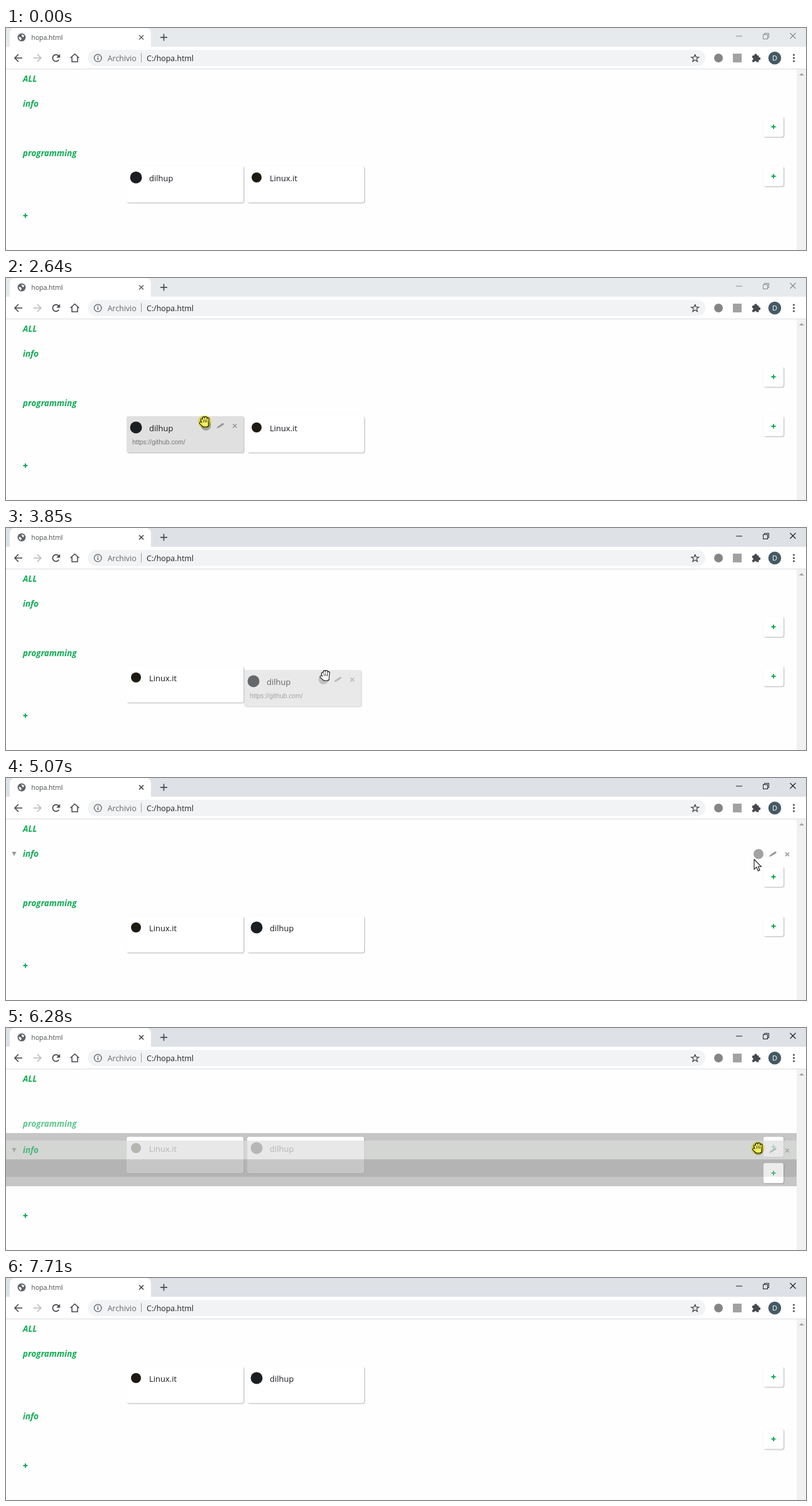
Animation, 1280 px wide and 355 px high, one loop 8340 ms. Source, as an HTML page with a canvas:

```html
<!DOCTYPE html>
<html lang="it">
<head>
<meta charset="utf-8">
<style>
html, body { margin: 0; width: 100%; height: 100%; overflow: hidden; background: #fefefe; }
canvas { display: block; }
</style>
</head>
<body>
<canvas id="stage" width="1280" height="355"></canvas>
<script>
const W = 1280, H = 355, LOOP = 8340;
const stage = document.getElementById('stage').getContext('2d');
const layerCanvas = document.createElement('canvas');
layerCanvas.width = W;
layerCanvas.height = H;
const layer = layerCanvas.getContext('2d');
let ctx = stage;

const GREEN = '#12ab55', DARK = '#46494d', UI = '"Open Sans", "Noto Sans", sans-serif';
const LEFT = 193, RIGHT = 386;

// time, pointer kind, x, y, hovered part, info heading y, programming heading y
const STEPS = [
  [0, '', 0, 0, '', 121, 200],
  [1420, 'arrow', 520, 304, 'plus', 121, 200],
  [1620, 'arrow', 475, 268, 'linux', 121, 200],
  [1830, 'arrow', 410, 250, 'linux', 121, 200],
  [2030, 'arrow', 350, 240, 'repo', 121, 200],
  [2240, 'hand', 320, 232, 'repo', 121, 200],
  [2440, 'hand', 318, 230, 'repo', 121, 200],
  [2640, 'press', 318, 230, 'repo', 121, 200],
  [2830, 'press', 333, 231, 'repo', 121, 200],
  [3040, 'press', 372, 233, 'repo', 121, 200],
  [3240, 'press', 428, 235, 'repo', 121, 200],
  [3450, 'press', 478, 235, 'repo', 121, 200],
  [3650, 'press', 506, 235, 'repo', 121, 200],
  [3850, 'hand', 511, 236, 'repo', 121, 200],
  [4060, 'hand', 513, 236, 'repo', 121, 200],
  [4260, 'arrow', 610, 226, '', 121, 200],
  [4460, 'arrow', 800, 209, 'programming', 121, 200],
  [4660, 'arrow', 1010, 190, 'programming', 121, 200],
  [4860, 'arrow', 1160, 151, '', 121, 200],
  [5070, 'arrow', 1197, 130, 'info', 121, 200],
  [5270, 'hand', 1200, 121, 'info', 121, 200],
  [5480, 'hand', 1200, 119, 'info', 121, 200],
  [5680, 'press', 1200, 119, 'info', 121, 200],
  [5900, 'press', 1200, 126, 'info', 128, 200],
  [6080, 'press', 1201, 163, 'info', 166, 200],
  [6280, 'press', 1203, 192, 'info', 195, 153],
  [6510, 'press', 1203, 200, 'info', 203, 121],
  [6690, 'arrow', 1204, 197, 'info', 207, 121],
  [6900, 'arrow', 1204, 207, 'info', 220.5, 121],
  [7110, 'arrow', 1203, 215, 'info', 220.5, 121],
  [7320, 'arrow', 1197, 240, '', 220.5, 121],
  [7490, 'arrow', 1120, 298, 'plus', 220.5, 121],
  [7710, '', 0, 0, '', 220.5, 121]
];

function rect(x, y, w, h, fill, r = 0) {
  ctx.fillStyle = fill;
  ctx.beginPath();
  ctx.roundRect(x, y, w, h, r);
  ctx.fill();
}
function disc(x, y, r, fill) {
  ctx.fillStyle = fill;
  ctx.beginPath();
  ctx.arc(x, y, r, 0, Math.PI * 2);
  ctx.fill();
}
function ring(x, y, r, color, width = 1.4, from = 0, to = Math.PI * 2) {
  ctx.strokeStyle = color;
  ctx.lineWidth = width;
  ctx.beginPath();
  ctx.arc(x, y, r, from, to);
  ctx.stroke();
}
function trace(x, y, pts) {
  ctx.beginPath();
  for (let i = 0; i < pts.length; i += 2) ctx.lineTo(x + pts[i], y + pts[i + 1]);
}
function line(x, y, pts, color, width = 1.6) {
  trace(x, y, pts);
  ctx.strokeStyle = color;
  ctx.lineWidth = width;
  ctx.stroke();
}
function shape(x, y, pts, fill) {
  trace(x, y, pts);
  ctx.fillStyle = fill;
  ctx.fill();
}
function text(s, x, y, font, color, align = 'left') {
  ctx.font = font;
  ctx.fillStyle = color;
  ctx.textAlign = align;
  ctx.fillText(s, x, y);
}
function cross(x, y, r, color, width) {
  line(x, y, [-r, -r, r, r], color, width);
  line(x, y, [r, -r, -r, r], color, width);
}
function plus(x, y, r, color, width) {
  line(x, y, [-r, 0, r, 0], color, width);
  line(x, y, [0, -r, 0, r], color, width);
}
function withAlpha(alpha, paint) {
  if (alpha === 1) return paint();
  layer.clearRect(0, 0, W, H);
  ctx = layer;
  paint();
  ctx = stage;
  ctx.globalAlpha = alpha;
  ctx.drawImage(layerCanvas, 0, 0);
  ctx.globalAlpha = 1;
}

function drawWindow(focused) {
  const frame = focused ? '#dee1e6' : '#e7eaed';
  const control = focused ? '#1c1c1c' : '#86888a';
  rect(0, 0, W, 30, frame);
  rect(0, 30, W, 35, '#fff');
  rect(0, 65, W, 1, '#dadce0');
  rect(6, 0, 226, 31, '#fff', [8, 8, 0, 0]);

  disc(25, 15, 6.5, '#5f6368');
  shape(25, 15, [-4.5, -1, -1, 0, 0, 2, -1.5, 5, -4, 2], '#fff');
  shape(25, 15, [0, -5, 4, -3, 3, 0, 1, -1, 0, -3], '#fff');
  text('hopa.html', 40.5, 19, '10.5px ' + UI, '#45494d');
  cross(216.5, 15, 3.5, focused ? '#3c4043' : '#5f6368', 1.6);
  plus(252.5, 15, 5.5, DARK, 1.7);
  line(1173, 13, [-5, 0, 5, 0], control, 1);
  ctx.strokeStyle = control;
  ctx.lineWidth = 1;
  ctx.strokeRect(1211.5, 10.5, 7, 7);
  line(1213.5, 10.5, [0, 0, 0, -2, 7, -2, 7, 5, 5, 5], control, 1);
  cross(1259, 12.5, 4.5, control, 1.1);
}

function drawToolbar() {
  const navArrow = (x, dir, color) => {
    line(x, 48, [-6 * dir, 0, 6 * dir, 0], color);
    line(x, 48, [0, -6, 6 * dir, 0, 0, 6], color);
  };
  navArrow(20, -1, DARK);
  navArrow(50, 1, '#babcbe');
  ring(80, 48, 5.3, DARK, 1.7, 0.5, 5.6);
  shape(80, 48, [6.5, -6.5, 6.5, -0.5, 0.5, -0.5], DARK);
  line(110, 48, [-7, 0, 0, -6.5, 7, 0], DARK);
  line(110, 48, [-4.5, -2, -4.5, 6, 4.5, 6, 4.5, -2], DARK);

  rect(131, 35, 988, 26, '#f1f3f4', 13);
  ring(147, 48, 5.8, '#5f6368', 1.3);
  rect(146.3, 47, 1.5, 4, '#5f6368');
  rect(146.3, 44.5, 1.5, 1.5, '#5f6368');
  text('Archivio', 162.5, 52.5, '12.4px ' + UI, '#65696d');
  rect(216, 40, 1, 15, '#9a9da0');
  text('C:/hopa.html', 225, 52.5, '12.4px ' + UI, '#202124');

  const star = [];
  for (let i = 0; i <= 10; i++) {
    const a = i * Math.PI / 5 - Math.PI / 2, r = i % 2 ? 2.7 : 6.3;
    star.push(r * Math.cos(a), r * Math.sin(a));
  }
  line(1102.5, 48.5, star, DARK, 1.3);

  disc(1140, 48, 7, '#858585');
  rect(1163, 41, 14, 14, '#a2a2a2');
  rect(1194, 44, 10.5, 10.5, DARK, 1);
  disc(1199.5, 43.5, 2.3, DARK);
  disc(1205, 49, 2.3, DARK);
  disc(1194, 49.5, 1.7, '#fff');
  disc(1199, 54.5, 1.7, '#fff');
  disc(1230, 48, 10.3, '#455a64');
  text('D', 1230, 52, '11px ' + UI, '#fff', 'center');
  for (const dy of [-5, 0, 5]) disc(1260.5, 48 + dy, 1.5, DARK);

  rect(1265, 66, 15, 289, '#f1f1f1');
  shape(1273, 74, [-4, 2, 0, -2, 4, 2], '#a3a3a3');
}

function box(x, y, w, h, fill) {
  ctx.shadowColor = 'rgba(0,0,0,.3)';
  ctx.shadowBlur = 2;
  ctx.shadowOffsetX = ctx.shadowOffsetY = 1;
  rect(x, y, w, h, fill, 3);
  ctx.shadowColor = 'transparent';
}

function drawTools(x, y) {
  const gray = '#999';
  disc(x, y, 8, '#a2a2a2');
  shape(x + 23, y, [-6, 4.5, -4.5, 1.5, 3.5, -4, 6, -3, 5, -1, -2.5, 3.5], gray);
  cross(x + 46, y + 0.5, 3, gray, 1.7);
}

function drawCard(card, x, y, hovered, pressed) {
  box(x, y, 187, 58, pressed ? '#e0e0e0' : '#fff');
  disc(x + 15, y + 18, card.radius, card.color);
  text(card.name, x + 36, y + 23.5, '13px ' + UI, '#15171c');
  if (!hovered) return;
  drawTools(x + 127, y + 15);
  text(card.url, x + 9, y + 44.5, '10.4px "Liberation Sans", Arial, sans-serif', '#777');
}

const CARDS = {
  linux: { name: 'Linux.it', url: 'https://linux.it/', color: '#1d1a12', radius: 8 },
  repo: { name: 'dilhup', url: 'https://github.com/', color: '#1b1f23', radius: 9.5 }
};

function heading(label, y) {
  text(label, 27, y + 5, 'italic bold 13.5px ' + UI, GREEN);
}

function drawSection(label, y, { height, hovered, lifted, header, cards }) {
  if (lifted) rect(0, y + 15, 1265, height, '#acacac');
  if (header) rect(0, y - 15, 1265, 30, `rgba(220,222,220,${header})`);
  heading(label, y);
  box(1212, y + 21, 32, 32, '#fff');
  plus(1228, y + 37, 3.5, GREEN, 2);
  if (cards) cards(y + 21);
  if (!hovered) return;
  shape(13, y, [-3.5, -3, 3.5, -3, 0, 4], '#999');
  drawTools(1204, y + 0.5);
}

function drawHand(x, y) {
  const fingers = [[-4.5, -3, -2, 4], [-1.8, -6, -0.5, 3], [1.7, -6.5, 1.5, 3], [5, -4.5, 4, 3], [-6.5, 2, -2, 6]];
  ctx.lineCap = 'round';
  for (const [color, width, grow] of [['#111', 4.8, 1], ['#fff', 2.7, 0]]) {
    for (const f of fingers) line(x, y, f, color, width);
    rect(x - 3.5 - grow, y + 1, 9 + grow * 2, 6.5 + grow, color, 3);
  }
  ctx.lineCap = 'butt';
  for (const dx of [-2, 0.6, 3.2]) line(x, y, [dx, -3, dx + 0.3, 1], '#222', 0.8);
}

function drawPointer(kind, x, y) {
  if (kind === 'arrow') {
    const tip = [0, 0, 0, 16, 3.7, 12.7, 6.3, 18.5, 9, 17.3, 6.5, 11.7, 11.3, 11.7, 0, 0];
    shape(x, y, tip, '#fff');
    line(x, y, tip, '#111', 1.1);
  } else if (kind) {
    drawHand(x, y);
    if (kind === 'press') {
      ctx.globalCompositeOperation = 'multiply';
      disc(x, y, 10.5, '#f3ef5c');
      ctx.globalCompositeOperation = 'source-over';
    }
  }
}

function render(time) {
  const [start, kind, x, y, hover, infoY, progY] = STEPS.findLast(s => s[0] <= time);
  const during = (from, to) => start >= from && start < to;
  const cardDrag = during(2640, 4060);
  const swapped = start >= 3240;

  ctx.fillStyle = '#fefefe';
  ctx.fillRect(0, 0, W, H);
  drawWindow(start >= 2830);
  drawToolbar();
  heading('ALL', 80.5);

  const progLifted = during(6280, 6900);
  const cards = top => {
    drawCard(CARDS.linux, swapped ? LEFT : RIGHT, top, hover === 'linux');
    if (!cardDrag) drawCard(CARDS.repo, swapped ? RIGHT : LEFT, top, hover === 'repo');
  };
  withAlpha(progLifted ? 0.67 : 1, () => drawSection('programming', progY, {
    height: 70, hovered: hover === 'programming', lifted: progLifted, cards
  }));

  const infoLifted = during(5680, 6900);
  withAlpha(infoLifted && infoY > 121 ? 0.67 : 1, () => drawSection('info', infoY, {
    height: 43, hovered: hover === 'info', lifted: infoLifted,
    header: infoLifted && (kind === 'press' ? 1 : 0.5)
  }));

  if (cardDrag) {
    const dx = Math.max(0, x - 323);
    withAlpha(start > 2640 ? 0.67 : 1, () =>
      drawCard(CARDS.repo, LEFT + dx, 221 + y - 230, true, true));
  }

  ctx.globalAlpha = hover === 'plus' ? 0.65 : 1;
  plus(31, 300, 3.5, GREEN, 2);
  ctx.globalAlpha = 1;
  drawPointer(kind, x, y);
}

const origin = performance.now();
function tick() {
  render((performance.now() - origin) % LOOP);
  requestAnimationFrame(tick);
}
tick();
</script>
</body>
</html>
```
